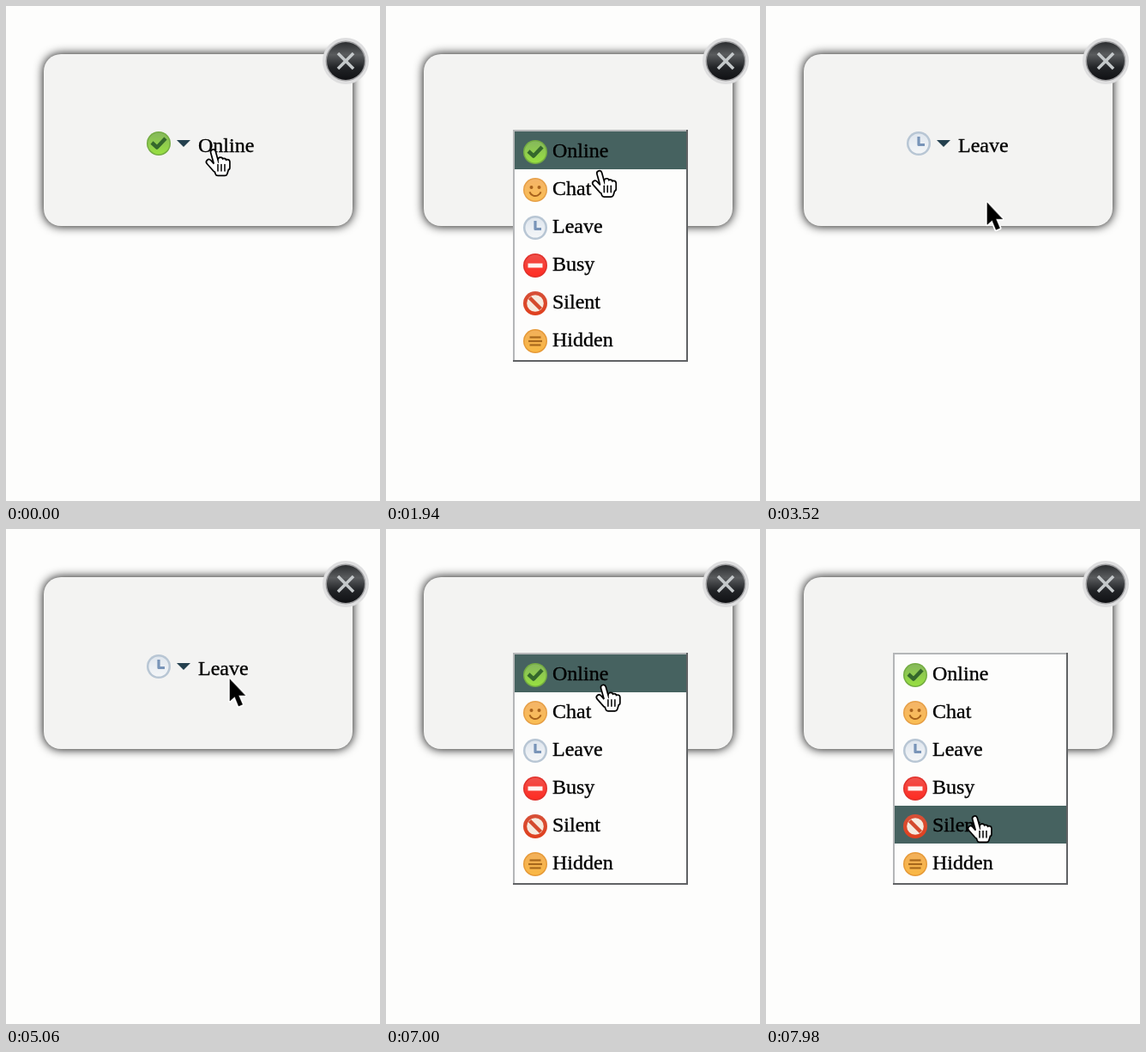
Recreate the animation shown at these times as an HTML page with a canvas. Size 436 by 576 pixels, loop 8000 ms.

```html
<!DOCTYPE html>
<html lang="en">
<head>
<meta charset="utf-8">
<title>Status menu</title>
<style>
html, body { margin: 0; width: 100%; height: 100%; overflow: hidden; background: #fdfdfc; }
canvas { display: block; width: 436px; height: 576px; }
</style>
</head>
<body>
<canvas id="stage"></canvas>
<script>
const W = 436, H = 576, LOOP = 8000;
const canvas = document.getElementById('stage');
const ratio = window.devicePixelRatio || 1;
canvas.width = W * ratio;
canvas.height = H * ratio;
const ctx = canvas.getContext('2d');

const PAGE = '#fdfdfc', PANEL = '#f3f3f2', HOVER = '#466260', INK = '#000';
const ROWS = ['Online', 'Chat', 'Leave', 'Busy', 'Silent', 'Hidden'];
const MENU = { x: 148, y: 144, w: 204, row: 44, edge: 2 };
const HOVER_LAG = 110;

const OPENED = 1040, PICKED = 2900, REOPENED = 6520;
const menuOpen = t => (t >= OPENED && t < PICKED) || t >= REOPENED;
const arrowShown = t => t >= PICKED + 100 && t < 5560;

// Each move eases the pointer to a new resting place
const HOME = { x: 241, y: 166 };
const MOVES = [
  { at: 300, ms: 500, x: 249, y: 161 },
  { at: 1660, ms: 690, x: 247, y: 243 },
  { at: 2950, ms: 350, x: 257, y: 246 },
  { at: 3300, ms: 700, x: 261, y: 175 },
  { at: 5200, ms: 500, x: 253, y: 173 },
  { at: 6950, ms: 350, x: 251, y: 301 },
  { at: 7300, ms: 500, x: 243, y: 333 }
];

const clamp = k => Math.min(1, Math.max(0, k));
const ease = k => k * k * (3 - 2 * k);

function pointerAt(t) {
  let { x, y } = HOME;
  for (const m of MOVES) {
    const k = ease(clamp((t - m.at) / m.ms));
    x += (m.x - x) * k;
    y += (m.y - y) * k;
  }
  return { x, y };
}

function at(x, y, paint) {
  ctx.save();
  ctx.translate(x, y);
  paint();
  ctx.restore();
}

function disc(x, y, r, fill) {
  ctx.beginPath();
  ctx.arc(x, y, r, 0, Math.PI * 2);
  ctx.fillStyle = fill;
  ctx.fill();
}

function box(x, y, w, h, fill) {
  ctx.fillStyle = fill;
  ctx.fillRect(x, y, w, h);
}

function line(color, width, x, y, ...rest) {
  ctx.strokeStyle = color;
  ctx.lineWidth = width;
  ctx.beginPath();
  ctx.moveTo(x, y);
  for (let i = 0; i < rest.length; i += 2) ctx.lineTo(rest[i], rest[i + 1]);
  ctx.stroke();
}

function shade(r, ...colors) {
  const g = ctx.createLinearGradient(0, -r, 0, r);
  colors.forEach((c, i) => g.addColorStop(i / (colors.length - 1), c));
  return g;
}

function ball(rim, top, bottom) {
  disc(0, 0, 14, rim);
  disc(0, 0, 12.5, shade(12.5, top, bottom));
}

const ICONS = {
  Online() {
    ball('#74ac42', '#86b85c', '#98e040');
    line('#35682c', 4.5, -8, -1, -2, 4.5, 8, -6);
  },
  Chat() {
    ball('#e6a048', '#f4b468', '#fabe54');
    for (const side of [-1, 1]) disc(side * 4.5, -3, 2, '#a8621c');
    ctx.strokeStyle = '#a8621c';
    ctx.lineWidth = 2;
    ctx.beginPath();
    ctx.arc(0, 0, 7, 0.35, Math.PI - 0.35);
    ctx.stroke();
  },
  Leave() {
    disc(0, 0, 14, '#b8c6d4');
    disc(0, 0, 11.5, shade(11.5, '#dfe6ee', '#f4f6f8'));
    line('#7894b8', 3.2, 0, -8, 0, 1.5, 7, 1.5);
  },
  Busy() {
    ball('#e0302a', '#f0504a', '#ff2c22');
    box(-8.5, -2.5, 17, 5, '#fff4f0');
  },
  Silent() {
    disc(0, 0, 14, shade(14, '#d65038', '#e0401e'));
    disc(0, 0, 9.8, '#f6eade');
    line('#d44a2c', 4.5, -6.5, -6.5, 6.5, 6.5);
  },
  Hidden() {
    ball('#e69a38', '#f2b05a', '#fab844');
    for (const row of [-1, 0, 1]) {
      const half = 8 - Math.abs(row) * 1.5;
      line('#a8681c', 2.2, -half, row * 4.5, half, row * 4.5);
    }
  }
};

// Thin outline thickens the face slightly
function label(text, x, y) {
  ctx.fillStyle = ctx.strokeStyle = INK;
  ctx.lineWidth = 0.35;
  ctx.fillText(text, x, y);
  ctx.strokeText(text, x, y);
}

function drawPanel() {
  ctx.save();
  ctx.shadowColor = '#000';
  ctx.shadowBlur = 12 * ratio;
  ctx.fillStyle = PANEL;
  ctx.beginPath();
  ctx.roundRect(44, 56, 360, 200, 20);
  ctx.fill();
  ctx.restore();
}

function drawClose() {
  disc(0, 0, 27, '#dededf');
  disc(0, 0, 23.5, '#a0a0a2');
  disc(0, 0, 22, shade(22, '#2c2e30', '#5a5c5e', '#222427', '#101114'));
  for (const side of [-1, 1]) line('#c4c8ca', 3.6, -9 * side, -9, 9 * side, 9);
}

function drawStatus(name) {
  at(178, 160, ICONS[name]);
  ctx.fillStyle = '#24404e';
  ctx.beginPath();
  ctx.moveTo(199, 156);
  ctx.lineTo(215, 156);
  ctx.lineTo(207, 164);
  ctx.fill();
  label(name, 224, 170);
}

function drawMenu(pointerY) {
  const { x, y, w, row, edge } = MENU;
  const h = ROWS.length * row + 3 * edge;
  box(x, y, w, h, '#606264');
  box(x, y, w - edge, h - edge, '#b4b6b8');
  box(x + edge, y + edge, w - 2 * edge, h - 2 * edge, PAGE);
  const top = y + edge;
  const hovered = Math.floor((pointerY - top) / row);
  ROWS.forEach((name, i) => {
    const rowY = top + i * row;
    if (i === hovered) box(x + edge, rowY, w - 2 * edge, row, HOVER);
    at(x + 26, rowY + 24, ICONS[name]);
    label(name, x + 46, rowY + 30);
  });
}

// Fingers are round strokes around a tapered palm
const HAND = new Path2D('M.5 4L5 20M-4.5 15.5L3 24M3 19H17L14 28.5H6Z');
for (let i = 0; i < 3; i++) {
  HAND.moveTo(9 + i * 4, 13 + i * 1.3);
  HAND.lineTo(9 + i * 4, 22);
}
const ARROW = new Path2D('M0 0V25L5.7 20L10.2 31L14.6 29.2L10 18.5H17.5Z');

function layer(path, color, width) {
  ctx.strokeStyle = ctx.fillStyle = color;
  ctx.lineWidth = width;
  ctx.stroke(path);
  ctx.fill(path);
}

function drawArrow() {
  layer(ARROW, '#fff', 4);
  layer(ARROW, INK, 0.5);
}

function drawHand() {
  layer(HAND, INK, 7.6);
  layer(HAND, '#fff', 4.2);
  for (let i = 0; i < 3; i++) line(INK, 1.5, 6 + i * 4, 18.5, 6 + i * 4, 26);
}

function draw(t) {
  ctx.setTransform(ratio, 0, 0, ratio, 0, 0);
  ctx.font = '24px "Liberation Serif", serif';
  ctx.lineJoin = 'round';
  box(0, 0, W, H, PAGE);
  drawPanel();
  at(396, 64, drawClose);
  if (menuOpen(t)) drawMenu(pointerAt(t - HOVER_LAG).y);
  else drawStatus(t < PICKED ? 'Online' : 'Leave');

  const { x, y } = pointerAt(t);
  ctx.lineCap = 'round';
  at(x, y, arrowShown(t) ? drawArrow : drawHand);
  ctx.lineCap = 'butt';
}

const start = performance.now();
function tick() {
  draw((performance.now() - start) % LOOP);
  requestAnimationFrame(tick);
}
tick();
</script>
</body>
</html>
```
